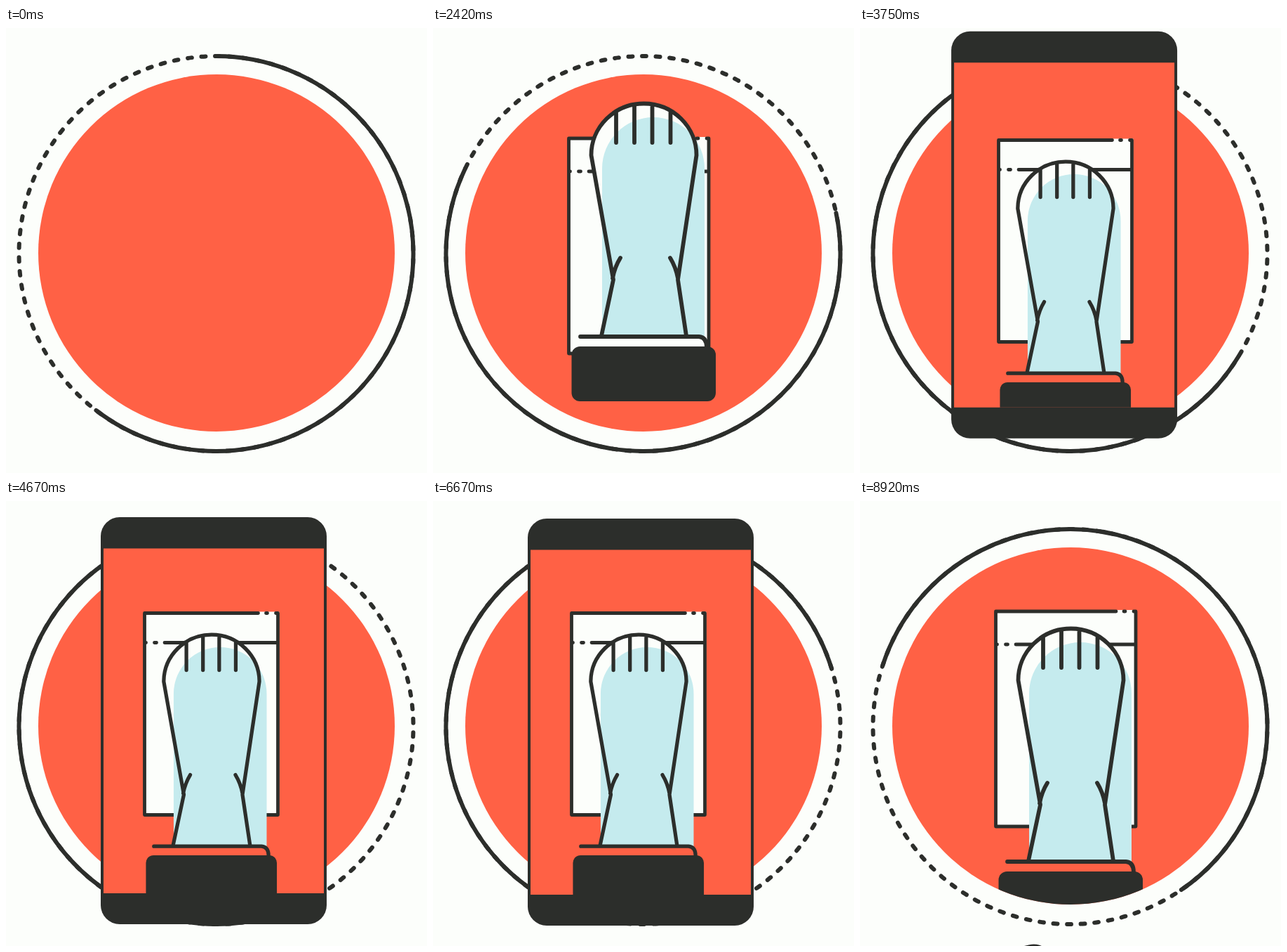
An HTML page that plays this animation: 600x633 px, repeating every 9.01 s.

```html
<!DOCTYPE html>
<html lang="en">
<head>
<meta charset="utf-8">
<title>Foot scan</title>
<style>
  html, body { margin: 0; width: 100%; height: 100%; overflow: hidden; background: #fcfefb; }
  svg { display: block; width: 600px; height: 633px; }
  .line { fill: none; stroke: #2c2e2b; stroke-linecap: round; stroke-linejoin: round; }
  .ring { stroke-width: 6; }
  .thin { stroke-width: 4.8; }
  .bold { stroke-width: 5.8; }
  .paper { fill: #fcfefb; }
  .orange { fill: #ff6145; }
  .dark { fill: #2c2e2b; }
  .blue { fill: #c5ebee; }
</style>
</head>
<body>
<svg viewBox="0 0 600 633">
  <defs>
    <clipPath id="disc"><circle cx="300" cy="320" r="254"/></clipPath>
    <clipPath id="screen"><rect id="screenShape" x="-157" y="-245" width="314" height="490.5"/></clipPath>
    <g id="foot">
      <path class="paper" d="M257 432L225.5 255A75 73.5 0 0 1 375.5 255L349 432Z"/>
      <path class="blue" d="M241 513V274A73 73 0 0 1 387 274V513Z"/>
      <path class="line bold" d="M240 512L257 432L225.5 255A75 73.5 0 0 1 375.5 255L349 432L361 512
        M256 430Q259 414 267 401M349 430Q346 414 338 401
        M261 194V237M287 183V237M312.5 183V237M338.5 193V237"/>
      <path class="line bold" d="M210 513H379Q390 514 390 528"/>
      <rect class="dark" x="197.5" y="527" width="205.5" height="78" rx="12"/>
    </g>
  </defs>

  <circle class="orange" cx="300" cy="320" r="254"/>
  <circle class="line ring" cx="299.5" cy="321" r="281" pathLength="360"
    stroke-dasharray="1.2 2.8" transform="rotate(-90.3 299.5 321)"/>
  <circle id="arc" class="line ring" cx="299.5" cy="321" r="281" pathLength="360"
    stroke-dasharray="217.5 142.5"/>

  <g clip-path="url(#disc)">
    <g id="sheet"></g>
    <use id="bigFoot" href="#foot"/>
  </g>

  <rect id="body" class="dark" x="-161" y="-289.5" width="322" height="579" rx="27"/>
  <g clip-path="url(#screen)">
    <rect class="orange" width="600" height="633"/>
    <g id="smallSheet"></g>
    <use href="#foot" transform="translate(20.1 25.4) scale(.908)"/>
  </g>
</svg>
<script>
  const LOOP = 9010, STEP = 250 / 3, LAST_STEP = 107;
  const $ = id => document.getElementById(id);
  const clamp = v => Math.min(1, Math.max(0, v));
  const progress = (t, from, to) => clamp((t - from) / (to - from));
  const sine = p => (1 - Math.cos(Math.PI * p)) / 2;
  const cubic = p => p < .5 ? 4 * p ** 3 : 1 - 4 * (1 - p) ** 3;

  // Eased value through a list of [time, value] keys.
  function track(t, keys) {
    let value = keys[0][1];
    for (let i = 1; i < keys.length; i++) {
      const [from, a] = keys[i - 1], [to, b] = keys[i];
      if (t >= from) value = a + (b - a) * sine(progress(t, from, to));
    }
    return value;
  }

  // Sheet with a ruled line; three of its edges are broken by short dashes.
  function drawSheet(group, left, top, right, rule, bottom) {
    group.innerHTML =
      `<path class="paper" d="M${left} ${top - 2}H${right + 2}V${bottom}H${left}Z"/>
       <path class="line thin" d="M${left} ${bottom}V${top}H${right - 28}
         M${right - 17} ${top}h2M${right - 3} ${top}h3V${bottom}
         M${left} ${rule}h2M${left + 14} ${rule}h3M${left + 28.5} ${rule}H${right}
         M${left} ${bottom}H${left + 124}m13 0h2m13 0H${right}"/>`;
  }

  function placePhone(t) {
    const rise = progress(t, 2600, 3660);
    const lift = track(t, [[2600, 643], [3660, -19], [4350, 0], [8000, 0], [8250, -6], [8920, 613.5]]);
    const tilt = 8.5 * (1 - rise * rise) + track(t, [[8250, 0], [8920, -13.5]]);
    const sway = 2.5 * Math.cos((t - 4670) * Math.PI / 1000) - 2.5;
    const drift = Math.max(0, t - 4670) / 1000;
    const place = `translate(${296 + sway} ${312.5 + drift + lift}) rotate(${tilt} 0 500)`;
    $('body').setAttribute('transform', place);
    $('screenShape').setAttribute('transform', place);
  }

  function render(t) {
    $('arc').setAttribute('transform', `rotate(${t * .03232 - 90} 299.5 321)`);
    const topLag = 420 * (1 - cubic(progress(t, 800, 1400)));
    const lag = 420 * (1 - cubic(progress(t, 1000, 1697)));
    drawSheet($('sheet'), 193.5, 157 + topLag, 393, 204 + lag, 463 + lag);
    const footY = track(t, [[1750, 420], [2250, -106], [2700, 0]]);
    $('bigFoot').setAttribute('transform', `translate(0 ${footY})`);
    placePhone(t);
  }

  const start = performance.now();
  function tick(now) {
    const t = Math.max(0, now - start) % LOOP;
    render(Math.min(LAST_STEP, Math.floor((t + 4) / STEP)) * STEP);
    requestAnimationFrame(tick);
  }

  drawSheet($('smallSheet'), 197.5, 159.5, 387.5, 201.5, 446.5);
  render(0);
  requestAnimationFrame(tick);
</script>
</body>
</html>
```
